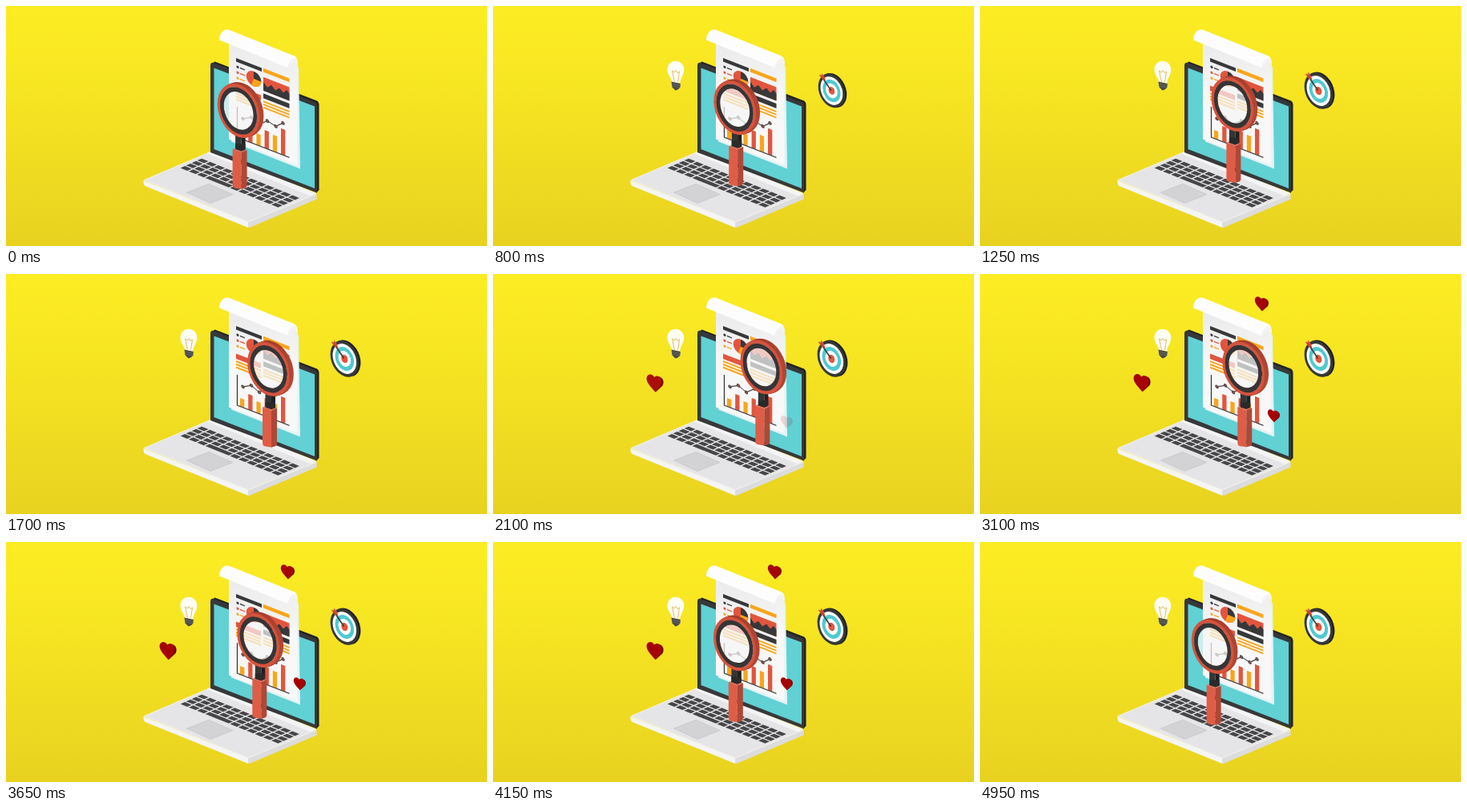
An HTML page for the animation above (5000 ms loop, 600x300 px).

```html
<!DOCTYPE html>
<html lang="en">
<head>
<meta charset="utf-8">
<title>Report under the lens</title>
<style>
  html, body { margin: 0; width: 100%; height: 100%; overflow: hidden; }
  svg { display: block; width: 100vw; height: 100vh; }
</style>
</head>
<body>
<svg viewBox="0 0 600 300" preserveAspectRatio="none">
  <defs>
    <linearGradient id="sky" x2="0" y2="1">
      <stop stop-color="#fced23"/><stop offset=".35" stop-color="#f6e522"/><stop offset="1" stop-color="#e8d220"/>
    </linearGradient>
    <linearGradient id="rim" x2="1" y2=".6">
      <stop stop-color="#9c3a2b"/><stop offset="1" stop-color="#b34633"/>
    </linearGradient>
    <linearGradient id="sheet" x2="0" y2="1">
      <stop offset=".1" stop-color="#ececec"/><stop offset=".5" stop-color="#f8f8f8"/>
    </linearGradient>
    <g id="heart">
      <path fill="#750307" d="M1 10.800 9.200 2.500C13-3.500 8.500-10.500 2.500-7.800L-3-4Z"/>
      <path fill="#a60306" d="M.4 11.300C-3 6.500-9 3-10.300-3.500-11.300-9.500-4.700-13.500-.6-7.500 3-11.500 8.800-8.500 8.300-2 7.800 3.500 3 6.500.4 11.300Z"/>
    </g>
  </defs>

  <rect width="600" height="300" fill="url(#sky)"/>

  <!-- laptop base -->
  <path fill="#f5f5f5" d="M171.500 218 302 270V277L173.500 225Q171 223 171.500 218Z"/>
  <path fill="#dcdcdd" d="M302 270 387.500 235V241.500L305 276.500Q303.500 277.300 302 277Z"/>
  <path fill="#e5e5e7" stroke="#f3f3f3" d="M172.500 217.500 256 182 387 235 302 270Z"/>
  <path fill="#f4f4f5" d="M251 184.500 257 181 387 234 380 237.500Z"/>
  <g id="keys" transform="matrix(10.300 4.170 -7 3.130 244 190)" fill="#464648"/>
  <path fill="#d3d3d5" stroke="#c3c3c5" stroke-width=".7" d="M225.500 233 253 222.500 283 235.500 255 246.500Z"/>

  <!-- lid -->
  <path fill="#232425" d="M257 72 260.500 69.500 388 118.500Q390.500 120 390.500 123V230L387 233.500Z"/>
  <path fill="#37383a" d="M255 75Q255 70 259 71L384.500 120Q388 121.500 388 125V233.500L255 183Z"/>
  <path fill="#61d1d4" d="M259.500 77.500 385 125.500V228L259.500 179Z"/>

  <!-- report -->
  <path fill="#e3f3f4" d="M281 50 365 76 367 203.500 281 169.500Z"/>
  <path fill="url(#sheet)" d="M278 38 363.500 68V199L278 166.500Z"/>
  <g id="report" transform="matrix(1 .39 0 1 278 0)"/>
  <path fill="#fdfdfd" d="M266 42.500C266 35 270.500 28.500 277.500 29.500L360 62.500Q364.500 65 363.500 75 362 70 358.500 70.500 353.500 71.500 351 77Z"/>
  <path fill="#f3f3f3" d="M351 77Q353.500 66 360 65 364.500 66 363.500 75 361.500 70 358 71 353.500 72.500 351 77Z"/>

  <!-- bulb -->
  <g id="bulb">
    <path fill="#fffef5" d="M223 95.500C223 90 217.500 86.500 217.500 79.500 217.500 73 222 68.800 227.500 68.800 233.500 68.800 238.500 73.500 238.300 80 238 87 233.500 90 233.300 96.500Z"/>
    <path fill="none" stroke="#dcb257" stroke-width=".9" d="M226.500 95 223.500 81 226 83 228 80.500 230 83.500 232.500 82 230.500 95"/>
    <path fill="#494a4c" d="M222.500 94.500 233.800 97 233.300 102 230.500 104.500 227.500 105.500 223.500 101.500Z"/>
    <path stroke="#757575" stroke-width=".7" d="M222.700 97 233.600 99.500M223.200 99.800 233 102"/>
  </g>

  <!-- target -->
  <g id="target">
    <g id="rings"></g>
    <path stroke="#3b3434" stroke-width="1.500" d="M409 87 421.500 105.500"/>
    <path fill="#df5139" d="M405.500 85 409 86 409 82.500 412 86 414.500 92 411 91.500Z"/>
    <path stroke="#8e3022" stroke-width=".8" d="M407 84.500 414 92.500"/>
  </g>

  <!-- magnifier -->
  <g id="lens">
    <path fill="#1f2021" d="M294 160 299 157V178L294 181Z"/>
    <path fill="#343536" d="M286.500 158 294 161V182L286.500 179Z"/>
    <path fill="#e8745d" d="M283 178.500 288.500 176 301 179.500 294 182.500Z"/>
    <path fill="#2a2a2b" d="M286.500 172H299V179L294 181 286.500 178.500Z"/>
    <path fill="#df5d46" d="M283 178.500 294 182.500V228.500L285.500 227Q283 226 283 223.500Z"/>
    <path fill="#ae4837" d="M294 182.500 301 179.500V224Q301 226 299 227L294 228.500Z"/>
    <g id="hoop"></g>
  </g>
  <g id="hearts"></g>
</svg>
<script>
const LOOP = 5000, STEP = 50;
const RED = '#e2553d', ORANGE = '#f9a51c', DARK = '#37383a', TEAL = '#50c9d0';
const $ = id => document.getElementById(id);

function add(parent, tag, attrs) {
  const el = document.createElementNS('http://www.w3.org/2000/svg', tag);
  for (const k in attrs) el.setAttribute(k, attrs[k]);
  return parent.appendChild(el);
}
const box = (g, x, y, width, height, fill) => add(g, 'rect', { x, y, width, height, fill });
const disc = (g, x, y, r, fill, skew, opacity = 1) =>
  add(g, 'circle', { r, fill, opacity, transform: `matrix(${skew} ${x} ${y})` });

// Keyboard, with a space bar in the front row
const keys = $('keys');
for (let row = 0; row < 4; row++) {
  for (let col = 0; col < 12; col++) {
    const space = row === 3 && col === 3;
    if (row === 3 && col > 3 && col < 6) continue;
    add(keys, 'rect', { x: col + .08, y: row + .1, width: space ? 2.84 : .82, height: .78 });
  }
}

// Report page, drawn in the slanted plane of the sheet
const page = $('report');
box(page, 9, 61.5, 32, 4.5, DARK);
box(page, 43, 61, 32.5, 4.8, ORANGE);
[DARK, RED, ORANGE].forEach((c, i) => {
  const y = 72 + i * 7;
  add(page, 'circle', { cx: 11, cy: y, r: 1.6, fill: c });
  box(page, 14, y - .6, 6, 1.3, c);
});
add(page, 'circle', { cx: 31, cy: 79, r: 9.3, fill: RED });
add(page, 'path', { d: 'M31 79V69.700A9.300 9.300 0 0 1 40.300 79Z', fill: DARK });
add(page, 'path', { d: 'M31 79H40.300A9.300 9.300 0 0 1 28 87.800Z', fill: ORANGE });
box(page, 43, 72, 32.5, 17, RED);
add(page, 'path', { d: 'M43 78 48 83 53 78 58 83 63 78 68 82 72 77 75.500 80V89H43Z', fill: DARK });
box(page, 43, 92.5, 32.5, 6, DARK);
for (let i = 0; i < 3; i++) box(page, 43, 101.5 + i * 3.8, 32.5, 2, ORANGE);
box(page, 9, 96, 31, 6.5, RED);
for (let i = 0; i < 3; i++) box(page, 9, 104.5 + i * 3.8, 31, 2.2, ORANGE);
[10, 19, 14, 22, 20, 32].forEach((h, i) =>
  box(page, 14 + i * 10.2, 159.5 - h, 5.3, h, i % 2 ? RED : ORANGE));
add(page, 'path', { d: 'M10.500 122V160H75.500', fill: 'none', stroke: DARK, 'stroke-width': 1.3 });
const marks = [[17.5, 134], [28, 128.5], [38, 133], [48, 125], [58.5, 127.5], [67.5, 120]];
add(page, 'polyline', { points: marks.join(' '), fill: 'none', stroke: '#4b4b4c', 'stroke-width': 1.1 });
marks.forEach(([cx, cy]) => add(page, 'circle', {
  cx, cy, r: 1.7, fill: '#a5584a', stroke: DARK, 'stroke-width': .9
}));

// Target rings and magnifier hoop
const FACE = '.84 .27 0 1.04', HOOP = '.85 .27 0 1.06';
disc($('rings'), 424.5, 105.4, 21.3, '#202123', FACE);
[[21.1, DARK], [17.6, '#fff'], [14, TEAL], [9.3, '#fff'], [4.8, RED]]
  .forEach(([r, c]) => disc($('rings'), 422.3, 106, r, c, FACE));

const hoop = $('hoop');
const band = (r, width, x, y, stroke) => add(hoop, 'circle', {
  r, fill: 'none', stroke, 'stroke-width': width, transform: `matrix(${HOOP} ${x} ${y})`
});
disc(hoop, 290.5, 130.5, 22, '#f5f6f6', HOOP, .72);
for (let i = 5; i > 0; i--) band(29.5, 3, 290.5 + i, 130.5 - i * .35, 'url(#rim)');
band(29, 4, 290.5, 130.5, '#d5533d');
band(24.4, 5.4, 290.5, 130.5, '#363435');

// Hearts: x, y, size, entrance
const hearts = [[202, 136, 1, 1750], [366.3, 177.2, .72, 2050], [351.3, 37.3, .82, 2380]]
  .map(([x, y, size, start]) => ({ x, y, size, start, el: add($('hearts'), 'use', { href: '#heart' }) }));

const clamp = v => Math.min(1, Math.max(0, v));
const wave = p => (1 - Math.cos(Math.PI * p)) / 2;

const POP = [[0, 0], [200, .94], [300, 1.08], [450, 1]];
function popScale(t) {
  if (t <= 0) return 0;
  for (let i = 1; i < POP.length; i++) {
    const [a, from] = POP[i - 1], [b, to] = POP[i];
    if (t < b) return from + (to - from) * wave((t - a) / (b - a));
  }
  return 1;
}
function pop(el, x, y, t) {
  const s = popScale(t);
  el.setAttribute('visibility', s ? 'visible' : 'hidden');
  el.setAttribute('transform', `translate(${x} ${y}) scale(${s}) translate(${-x} ${-y})`);
}

function draw(t) {
  const p = t < 2400 ? wave(t / 2400) : wave((LOOP - t) / 2600);
  $('lens').setAttribute('transform', `translate(${46.5 * p - .4} ${.4 - 15 * p})`);
  pop($('bulb'), 228, 87, t - 300);
  pop($('target'), 423.5, 105.5, t - 600);
  for (const h of hearts) {
    const a = Math.min(clamp((t - h.start) / 370), clamp((4900 - t) / 400));
    h.el.setAttribute('opacity', a);
    h.el.setAttribute('transform',
      `translate(${h.x} ${h.y + 9 * (1 - a)}) scale(${h.size}) skewY(6)`);
  }
}

const begin = performance.now();
function tick() {
  const t = (performance.now() - begin) % LOOP;
  draw(Math.floor(t / STEP) * STEP);
  requestAnimationFrame(tick);
}
tick();
</script>
</body>
</html>
```
